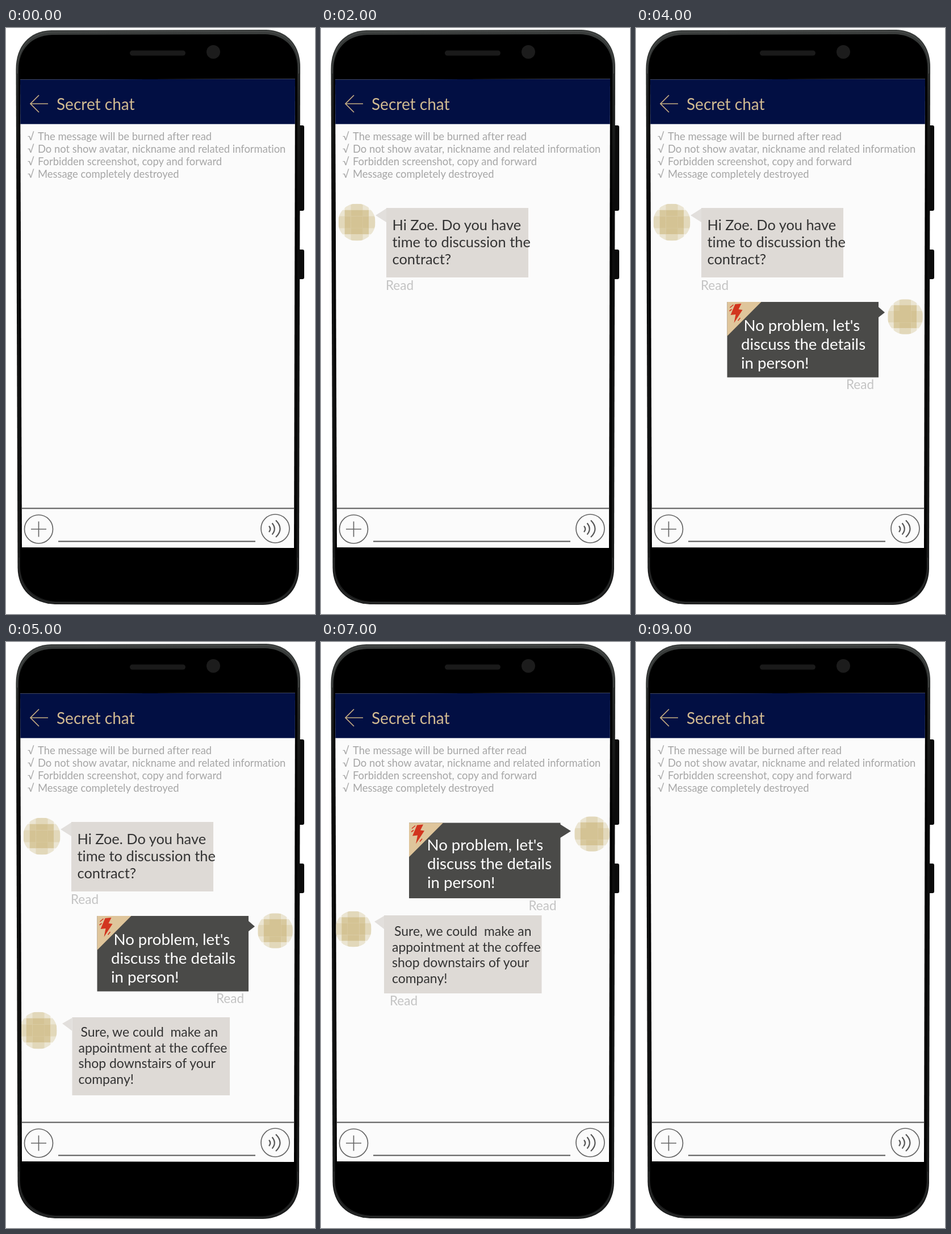
These frames come from a looping animation (544x1029 px, 10 s). An HTML page:

```html
<!DOCTYPE html>
<html lang="en">
<head>
<meta charset="utf-8">
<title>Secret chat</title>
<style>
html, body { margin: 0; width: 100%; height: 100%; overflow: hidden; background: #fff; }
svg { display: block; width: 100%; height: 100%; }
text { font-family: Lato, sans-serif; white-space: pre; font-variant-ligatures: none; }
.note { font-size: 18.4px; fill: #a6a6a6; }
.read { font-size: 22.5px; fill: #c4c4c4; }
.ask { font-size: 25.4px; fill: #333; }
.reply { font-size: 27.6px; fill: #fff; }
.plan { font-size: 22.95px; fill: #333; }
.icon { fill: none; stroke: #666; stroke-width: 1.7; }
.waves { stroke: #555; stroke-width: 2.2; }

/* Each part is simply on or off, in whole seconds of a 10 s loop. */
.step { visibility: hidden; animation: 10s step-end infinite; }
.ask-in { animation-name: askIn; }
.ask-read { animation-name: askRead; }
.reply-in { animation-name: replyIn; }
.reply-read { animation-name: replyRead; }
.plan-in { animation-name: planIn; }
.plan-read { animation-name: planRead; }
.two-left { animation-name: twoLeft; }
.one-left { animation-name: oneLeft; }
@keyframes askIn { 0%, 70% { visibility: hidden } 10% { visibility: visible } }
@keyframes askRead { 0%, 70% { visibility: hidden } 20% { visibility: visible } }
@keyframes replyIn { 0%, 70% { visibility: hidden } 30% { visibility: visible } }
@keyframes replyRead { 0%, 70% { visibility: hidden } 40% { visibility: visible } }
@keyframes planIn { 0%, 70% { visibility: hidden } 50% { visibility: visible } }
@keyframes planRead { 0%, 70% { visibility: hidden } 60% { visibility: visible } }
@keyframes twoLeft { 0%, 80% { visibility: hidden } 70% { visibility: visible } }
@keyframes oneLeft { 0%, 90% { visibility: hidden } 80% { visibility: visible } }
</style>
</head>
<body>
<svg viewBox="0 0 544 1029" preserveAspectRatio="none">
  <defs>
    <clipPath id="screen"><path d="M25 90.500L509 89.500L507 913L28 912Z"/></clipPath>
    <clipPath id="round"><circle r="33"/></clipPath>
    <linearGradient id="rim" x2="0" y2="1">
      <stop offset="0" stop-color="#3a3d3c"/>
      <stop offset=".12" stop-color="#202221"/>
      <stop offset=".3" stop-color="#0b0b0b"/>
      <stop offset=".8" stop-color="#161717"/>
      <stop offset="1" stop-color="#1c1d1d"/>
    </linearGradient>
    <g id="avatar" clip-path="url(#round)"></g>
    <g id="bolt" fill="#d2351f">
      <path d="M14 4L25 3L20 13L27 14L12 37L15 22L6 23Z"/>
      <path d="M5 10l6-5M4 16l4-3M19 33l4-5" stroke="#d2351f" stroke-width="1.6"/>
    </g>
  </defs>

  <g id="phone">
    <path d="M514 171h8q3 0 3 3v144q0 3-3 3h-8zM514 389h8q3 0 3 3v46q0 3-3 3h-8z" fill="#0b0b0b"/>
    <path d="M17.500 72C17.500 33 40 5 80 4L458 3C496 4 518 31 518 68L516 950C515 988 490 1012 452 1013L86 1012C46 1010 21 986 20.500 948Z" fill="url(#rim)"/>
    <path d="M22 74C22 38 44 13 82 12L456 11C492 12 513 36 513 70L511.500 948C510 984 486 1007 450 1008L88 1007C50 1005 26 981 25 946Z"/>
    <path d="M23 930V947C24 984 48 1008 87 1009.500L451 1010.500C488 1009 512 985 513.500 949V930" fill="none" stroke="#333434"/>
    <path d="M20 80V72C20 36 42 8 81 7L457 6C494 7 515.500 33 515.500 68V80" fill="none" stroke="#505352"/>
    <rect x="218" y="39.500" width="98" height="9" rx="4.500" fill="#1a1a1a"/>
    <circle cx="365" cy="42" r="12" fill="#1c1c1c"/>
  </g>

  <g clip-path="url(#screen)">
    <rect x="20" y="85" width="495" height="835" fill="#fbfbfb"/>
    <rect x="20" y="85" width="495" height="83.700" fill="#020f43"/>
    <path d="M74 133H43M58 118L43 133L58 148" fill="none" stroke="#c5ad83" stroke-width="1.700"/>
    <text x="89" y="144" font-size="28" fill="#d1ba91">Secret chat</text>
    <g id="notes"></g>
    <g id="chat"></g>
    <path d="M27 843.500H508M92 901.500H439" stroke="#565656" stroke-width="2"/>
    <g class="icon">
      <circle cx="57.500" cy="880" r="25"/>
      <path d="M44 880H71M57.500 866.500V893.500"/>
      <circle cx="474" cy="879" r="25"/>
      <path class="waves" d="M463 874.500Q467.500 879.500 463 885M468.500 869.500Q477 879.500 468.500 889.500M475 864.500Q490 879.500 475 894"/>
    </g>
  </g>
</svg>
<script>
const text = (style, x, y, str) => `<text class="${style}" x="${x}" y="${y}">${str}</text>`;
const lines = (style, x, y, gap, rows, firstX = x) =>
  rows.map((row, i) => text(style, i ? x : firstX, y + i * gap, row)).join('');
const avatar = (x, y, scale = 1) => `<use href="#avatar" transform="translate(${x} ${y}) scale(${scale})"/>`;
const box = (x, y, w, h, fill) => `<rect x="${x}" y="${y}" width="${w}" height="${h}" fill="${fill}"/>`;
const tail = (points, fill) => `<polygon points="${points}" fill="${fill}"/>`;
const step = (name, body) => `<g class="step ${name}">${body}</g>`;
const read = (x, y) => text('read', x, y, 'Read');

const LIGHT = '#dedad6', TAIL = '#e2dfdc', DARK = '#4a4a48';

// Blurred tan disc: square cells that pale towards the edge.
function mosaic() {
  const cell = 10.7;
  let cells = '';
  for (let i = -3; i < 3; i++) {
    for (let j = -3; j < 3; j++) {
      const dist = Math.hypot(i + 0.5, j + 0.5) * cell;
      const tint = Math.max(0.08, Math.min(1, (38 - dist) / 17));
      const color = [251, 251, 251].map((c, k) => Math.round(c + ([212, 195, 148][k] - c) * tint));
      cells += box(i * cell, j * cell, cell + 0.2, cell + 0.2, `rgb(${color})`);
    }
  }
  return cells;
}

const ask = avatar(63, 341) + box(115, 316, 250, 122, LIGHT) +
  tail('96,329 115,317 115,341', TAIL) +
  lines('ask', 125.5, 354.5, 30.4, ['Hi Zoe. Do you have', 'time to discussion the', 'contract?']);

function reply(x, y, tip, textX, textY, firstX) {
  return box(x, y, 266.5, 132.5, DARK) + tail(tip, DARK) +
    `<path d="M${x} ${y}h60l-60 60z" fill="#dfc59b"/>` +
    `<use href="#bolt" x="${x}" y="${y}"/>` +
    lines('reply', textX, textY, 33, ['No problem, let\'s', 'discuss the details', 'in person!'], firstX);
}

function plan(x, y, tipX, textX, textY, firstX) {
  return box(x, y, 277.5, 137, LIGHT) +
    tail(`${tipX},${y + 11} ${x},${y + 1} ${x},${y + 24}`, TAIL) +
    lines('plan', textX, textY, 27.5,
      ['Sure, we could  make an', 'appointment at the coffee', 'shop downstairs of your', 'company!'], firstX);
}

document.getElementById('avatar').innerHTML = mosaic();

document.getElementById('notes').innerHTML = [
  'The message will be burned after read',
  'Do not show avatar, nickname and related information',
  'Forbidden screenshot, copy and forward',
  'Message completely destroyed'
].map((note, i) => text('note', 38, 197 + i * 22, '√') + text('note', 56, 197 + i * 22, note)).join('');

document.getElementById('chat').innerHTML =
  step('ask-in', ask) +
  step('ask-read', read(114, 460)) +
  step('reply-in', avatar(474, 507, 0.95) + reply(160.5, 481, '427,490 438,499.5 427,508', 185, 532, 189.5)) +
  step('reply-read', read(370, 634)) +
  step('plan-in', avatar(57, 682) + plan(116.5, 659, 99, 127.5, 693, 131.5)) +
  step('plan-read', read(126, 817)) +
  step('two-left',
    avatar(477, 337, 0.95) + reply(155, 317.5, '421,320 440,332 421,344', 187, 366, 186.5) + read(365.5, 471) +
    avatar(57, 504, 0.97) + plan(111, 480, 94, 125, 516, 129) + read(121, 638)) +
  step('one-left', avatar(60.5, 338) + plan(116, 317, 99, 129.5, 351) + read(119, 475));
</script>
</body>
</html>
```
